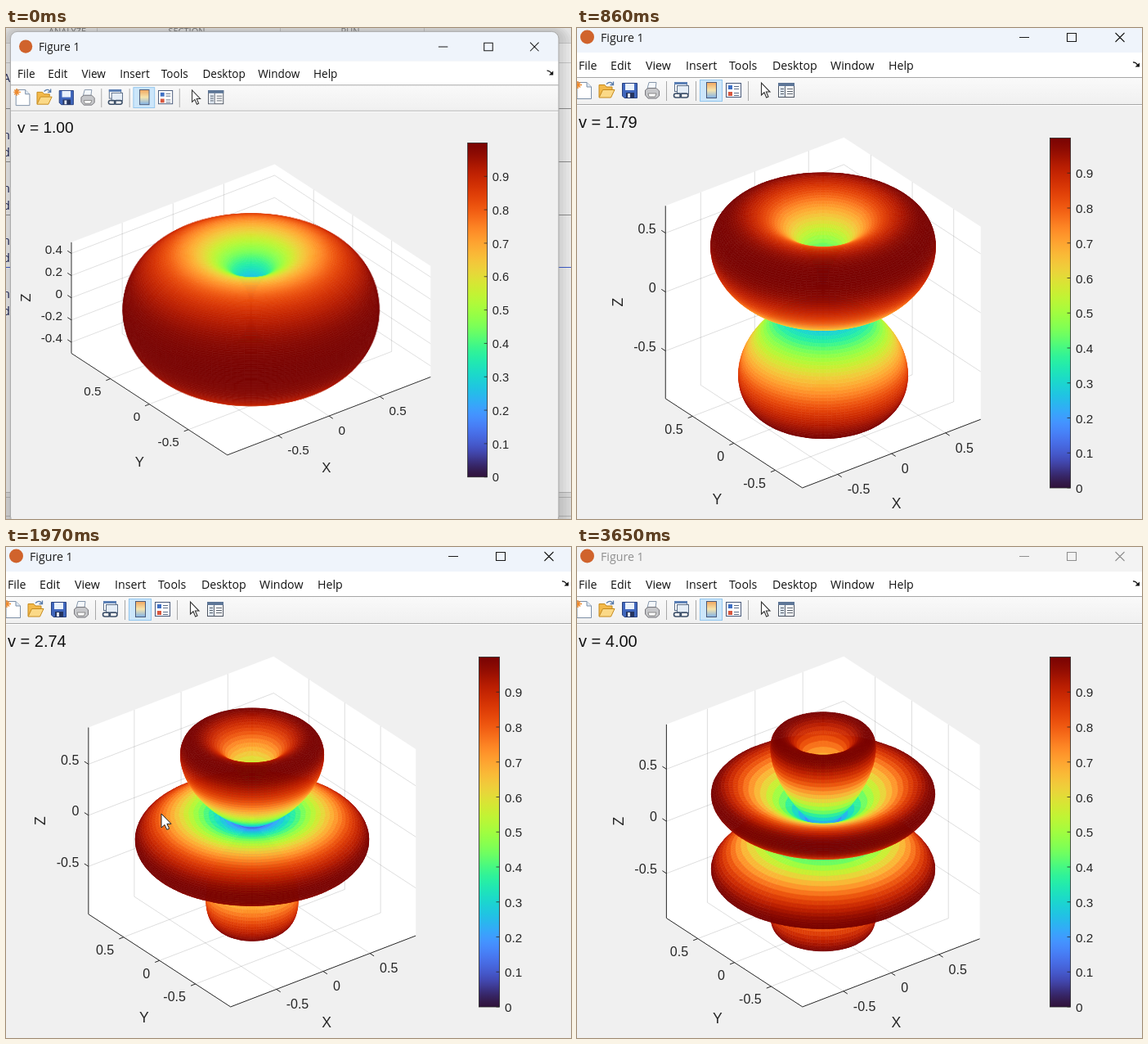
An HTML page with a canvas that plays this animation: 691x600 px, repeating every 3.77 s.

```html
<!DOCTYPE html>
<html lang="en">
<head>
<meta charset="utf-8">
<title>Figure 1</title>
<style>
html, body { margin: 0; width: 100%; height: 100%; overflow: hidden; background: #f0f0f0; }
#stage { position: relative; width: 691px; height: 600px; overflow: hidden; }
#stage svg, #stage canvas, #win { position: absolute; left: 0; top: 0; width: 691px; height: 600px; }
#stage svg { overflow: visible; }
#win { transform-origin: 271px 267px; }
.ui { font-family: "Open Sans", "Noto Sans", sans-serif; }
.plot { font-family: "Liberation Sans", Arial, sans-serif; }
</style>
</head>
<body>
<div id="stage">
  <svg id="desk"></svg>
  <div id="win">
    <svg><g id="chrome"></g><g id="axes"></g></svg>
    <canvas id="surface" width="691" height="600"></canvas>
  </div>
  <svg><path id="pointer" d="M190 326V343L194 339.4 196.8 345.4 199.6 344.1 196.9 338.3H202Z" fill="#fff" stroke="#222" stroke-width="1"/></svg>
</div>
<script>
const LOOP = 3770;
const STEPS = [0, 180, 310, 460, 630, 860, 990, 1160, 1390, 1540,
  1790, 1920, 2020, 2190, 2420, 2570, 2740, 2970, 3120, 3270];
const CENTER = { x: 301, y: 347.8 };
const FIT = { w: 460, h: 428.3 };
const AZ = -37.5 * Math.PI / 180, EL = Math.PI / 6;
const CA = Math.cos(AZ), SA = Math.sin(AZ), SE = Math.sin(EL), CE = Math.cos(EL);
const BAR = { x: 578.5, y: 134.5, w: 25, h: 427.5 };
const INK = "#262626";

const $ = id => document.getElementById(id);
const ctx = $("surface").getContext("2d");

const rect = (x, y, w, h, fill, more = "") =>
  `<rect x="${x}" y="${y}" width="${w}" height="${h}" fill="${fill}" ${more}/>`;
const path = (d, stroke, width = 1, fill = "none", more = "") =>
  `<path d="${d}" stroke="${stroke}" stroke-width="${width}" fill="${fill}" ${more}/>`;
const text = (x, y, str, size, kind = "plot", anchor = "start", fill = INK, more = "") =>
  `<text class="${kind}" x="${x}" y="${y + size * 0.36}" font-size="${size}" text-anchor="${anchor}" fill="${fill}" ${more}>${str}</text>`;

const STOPS = [0x30123b, 0x4454c4, 0x4490fe, 0x1fc8de, 0x29efa2, 0x7dff56,
  0xc1f334, 0xf1ca3a, 0xfe922a, 0xea4f0d, 0xbe2102, 0x7a0403];

// Smooth curve through the colour stops, x from 0 to 1.
function turbo(x) {
  const last = STOPS.length - 1, i = Math.min(last - 1, Math.floor(x * last)), f = x * last - i;
  const rgb = [16, 8, 0].map(bits => {
    const [a, b, c, d] = [-1, 0, 1, 2].map(k => STOPS[Math.min(last, Math.max(0, i + k))] >> bits & 255);
    const value = b + f / 2 * (c - a + f * (2 * a - 5 * b + 4 * c - d + f * (3 * (b - c) + d - a)));
    return Math.round(Math.min(255, Math.max(0, value)));
  });
  return `rgb(${rgb})`;
}

function drawDesk() {
  let s = rect(0, 0, 691, 600, "#f2f2f2") + rect(0, 0, 691, 18, "#e3e3e3") +
    path("M0 18.5H691M0 42.5H691", "#cbcbcb") +
    path("M0 98.5H691M0 163.5H691M0 228.5H691", "#8f8f8f") +
    path("M0 292.5H691", "#3f5fd0") +
    rect(0, 567, 691, 33, "#e0e0e0") + path("M0 567.5H691M0 573.5H691M0 596.5H691", "#b8b8b8") +
    path("M111.5 0V18M335.5 0V18M511.5 0V18", "#c4c4c4");
  [[75, "ANALYZE"], [221, "SECTION"], [421, "RUN"]].forEach(([x, t]) => {
    s += text(x, 4, t, 11, "ui", "middle", "#777");
  });
  s += text(5, 61, "A", 14, "ui", "end", "#222a5a");
  for (let i = 0; i < 4; i++) {
    s += text(5, 131 + i * 64.4, "n", 15, "ui", "end", "#222a5a") +
      text(5, 152 + i * 64.4, "d", 15, "ui", "end", "#222a5a");
  }
  $("desk").innerHTML = s;
}

function toolbar() {
  const page = "M0 66.5H12L17.5 72V86.5H0Z";
  let s = path(page, "#7c8fa6", 1, "#fff") + path("M12 66.5V72H17.5", "#7c8fa6", 1, "#dfe9f4") +
    path("M1 65V74M-3 69.5H6M-2 66.5L4 72.5M4 66.5L-2 72.5", "#ef8a2c", 1.5);
  s += path("M27 84.5V69.5H34L36 72H43V75", "#c58a1e", 1, "#f3b94a") +
    path("M27 85L31.5 75.5H46L41.5 85Z", "#c58a1e", 1, "#fbd987") +
    path("M36 68.5Q41 64 44 69M44.5 65.5V69.5H40.5", "#5579a8", 1.3);
  s += path("M55.5 67.5H73.5V85.5H58L55.5 83Z", "#27407f", 1, "#4067bd") +
    rect(59, 68, 11, 8, "#eaf2fc") + rect(60, 79, 10, 6.5, "#25345e") + rect(62, 80, 3, 5, "#dfe6f2");
  s += path("M86 74L88 66.5H97L96 74Z", "#8797aa", 1, "#f4f8fc") +
    path("M83.5 76L87 73.5H97L100.5 77V83L97 86H87L83.5 82Z", "#77777c", 1, "#c6c7ca") +
    path("M87 80H97L95.5 84H88Z", "#888", 1, "#fff");
  s += rect(119.5, 66.5, 15, 11, "#fff", 'stroke="#596c86"') + rect(119, 66, 16, 3, "#5a7fb5") +
    rect(122.5, 70.5, 14, 10, "#e5edf6", 'stroke="#596c86"') +
    rect(118.5, 80, 9, 5, "none", 'rx="2.5" stroke="#3c4f68" stroke-width="1.6"') +
    rect(126, 80, 10, 5, "none", 'rx="2.5" stroke="#3c4f68" stroke-width="1.6"');
  s += rect(150.5, 63.5, 27, 26, "#cce6fa", 'stroke="#92c6ee"') +
    rect(158.5, 66.5, 12, 19, "url(#mini)", 'stroke="#4d5a78"');
  s += rect(182.5, 67.5, 18, 17, "#fff", 'stroke="#48597a"') +
    rect(185, 70, 5, 5, "#3f70c4") + rect(185, 78, 5, 5, "#d8573f") +
    path("M192 71.5H198M192 74.5H198M192 79.5H198M192 82.5H198", "#5c6d88");
  s += path("M225.5 67V82L229 78.8 231.7 85 234 84 231.4 78H236Z", "#333", 1.1, "#fff");
  s += rect(246.5, 67.5, 19, 17, "#fff", 'stroke="#4b5361"') + rect(246, 67, 20, 4, "#5d7697") +
    rect(248, 72, 6, 12, "#dce5ef") +
    path("M254.5 71V84M249 74.5H253M249 77.5H253M249 80.5H253M257 74.5H264M257 77.5H264M257 80.5H264", "#59616d");
  return s + path("M109.5 65V89M145.5 65V89M209.5 65V89", "#a8a8a8");
}

function drawChrome() {
  const stops = Array.from({ length: 65 }, (_, i) =>
    `<stop offset="${i / 64}" stop-color="${turbo(i / 64)}"/>`).join("");
  let s = `<defs><linearGradient id="bar" x1="0" y1="1" x2="0" y2="0">${stops}</linearGradient>
    <linearGradient id="mini" x1="0" y1="0" x2="0" y2="1"><stop stop-color="#f0a65f"/>
    <stop offset=".5" stop-color="#f6e4ad"/><stop offset="1" stop-color="#7fb2e8"/></linearGradient>
    <linearGradient id="tools" x1="0" y1="0" x2="0" y2="1"><stop stop-color="#fafafa"/>
    <stop offset="1" stop-color="#f0f0f0"/></linearGradient>
    <clipPath id="frame"><rect x="-7" y="-8" width="702" height="629" rx="9"/></clipPath></defs>`;
  for (let d = 2; d <= 18; d += 4) {
    s += rect(-7 - d, -8 - d / 2, 702 + 2 * d, 640 + 2 * d, "#000", `opacity=".03" rx="${9 + d}"`);
  }
  s += `<g clip-path="url(#frame)">` + rect(-7, -8, 702, 629, "#f0f0f0") +
    rect(-7, -8, 702, 38, "#eff4fb", 'id="caption"') + rect(-7, 30, 702, 30, "#fff") +
    rect(-7, 60, 702, 33, "url(#tools)") + path("M-7 60.5H695M-7 93.5H695", "#a6a6a6") +
    path("M-7 94.5H695", "#fff") + "</g>";
  s += rect(-7, -8, 702, 629, "none", 'rx="9" stroke="#a9a9a9"');
  s += `<circle cx="12.5" cy="11" r="8.5" fill="#d0632c"/>`;
  s += `<g id="title">` + text(29, 11.5, "Figure 1", 14.2, "ui", "start", "currentColor") +
    path("M541 11.5H553M599.5 6.5H610.5V16.5H599.5ZM658.5 6L669.5 17M669.5 6L658.5 17", "currentColor", 1.1) + "</g>";
  [["File", 2], ["Edit", 41], ["View", 84], ["Insert", 133], ["Tools", 186],
    ["Desktop", 239], ["Window", 310], ["Help", 381]].forEach(([t, x]) => {
    s += text(x, 45.8, t, 14.2, "ui", "start", "#111");
  });
  s += path("M680 42Q683 41.5 686 45.5", "#111", 1.3) + path("M688 42.5V47.5H682.5Z", "none", 0, "#111") + toolbar();
  s += rect(BAR.x, BAR.y, BAR.w, BAR.h, "url(#bar)", `stroke="${INK}" stroke-width=".8"`);
  for (let i = 0; i < 10; i++) {
    const y = BAR.y + BAR.h * (1 - i / 10);
    s += path(`M${BAR.x + BAR.w} ${y}h-4`, INK, 0.8) +
      text(610, y + 0.5, i ? "0." + i : "0", 15.3);
  }
  $("chrome").innerHTML = s;
}

// Extent of r = |sin(v * theta)| and the scale that fits its tight box.
function measure(v) {
  let R = 0, lo = 0, hi = 0;
  for (let i = 0; i <= 720; i++) {
    const a = i * Math.PI / 720, r = Math.abs(Math.sin(v * a));
    R = Math.max(R, r * Math.sin(a));
    lo = Math.min(lo, r * Math.cos(a));
    hi = Math.max(hi, r * Math.cos(a));
  }
  const w = 2 * R * (CA - SA), h = w * SE + (hi - lo) * CE;
  return { R, lo, hi, mid: (lo + hi) / 2, s: Math.min(FIT.w / w, FIT.h / h) };
}

function drawAxes(v, m) {
  const { R, lo, hi, s } = m;
  const at = (x, y, z) => [
    CENTER.x + s * (x * CA + y * SA),
    CENTER.y - s * ((CA * y - SA * x) * SE + (z - m.mid) * CE)
  ];
  const line = (...pts) => "M" + pts.map(p => p.map(n => n.toFixed(2)).join(" ")).join("L");
  const zStep = hi - lo < 1.2 ? 0.2 : 0.5;
  const zTicks = [-2, -1, 0, 1, 2].map(k => k * zStep).filter(z => z > lo && z < hi);
  const label = n => String(+n.toFixed(1));
  let grid = "", ticks = "", words = "";
  for (const k of [-0.5, 0, 0.5]) {
    grid += line(at(k, -R, lo), at(k, R, lo), at(k, R, hi)) +
      line(at(-R, k, lo), at(R, k, lo), at(R, k, hi));
    const [xx, xy] = at(k, -R, lo), [yx, yy] = at(-R, k, lo);
    ticks += line([xx, xy], [xx + 5, xy + 3.3]) + line([yx, yy], [yx - 5.6, yy + 2.2]);
    words += text(xx + 12, xy + 18, label(k), 16) +
      text(yx - 11.7, yy + 15.8, label(k), 16, "plot", "end");
  }
  for (const z of zTicks) {
    const [x, y] = at(-R, R, z);
    grid += line([x, y], at(R, R, z), at(R, -R, z));
    ticks += line([x, y], [x - 5, y - 3.3]);
    words += text(x - 11.5, y - 5.5, label(z), 16, "plot", "end");
  }
  const left = at(-R, R, lo), front = at(-R, -R, lo), right = at(R, -R, lo);
  const hull = line(left, front, right, at(R, -R, hi), at(R, R, hi), at(-R, R, hi)) + "Z";
  const wide = R * s - 144;
  const [zx, zy] = at(-R, R, m.mid), [nx, ny] = at(0, -R, lo), [wx, wy] = at(-R, 0, lo);
  words += text(nx + 3.7 - wide * 0.35, ny + 62 + wide * 0.17, "X", 17.6, "plot", "middle") +
    text(wx - 18.5 + wide * 0.3, wy + 69.5 + wide * 0.2, "Y", 17.6, "plot", "middle") +
    text(0, 0, "Z", 17.6, "plot", "middle", INK, `transform="translate(${zx - 58.8} ${zy}) rotate(-90)"`) +
    text(2, 114.5, "v = " + v.toFixed(2), 20, "plot", "start", "#111");
  $("axes").innerHTML = path(hull, "none", 0, "#fff") + path(grid, INK, 1, "none", 'opacity=".15"') +
    path(line(at(-R, R, hi), left, front, right) + ticks, INK, 1) + words;
}

function drawSurface(v, m) {
  const NT = 180, NP = 120, rows = [], quads = [];
  for (let i = 0; i <= NT; i++) {
    const a = i * Math.PI / NT, r = Math.abs(Math.sin(v * a));
    const ring = r * Math.sin(a), z = r * Math.cos(a), row = [];
    for (let j = 0; j <= NP; j++) {
      const p = j * 2 * Math.PI / NP, back = ring * Math.sin(p);
      row.push([
        CENTER.x + m.s * ring * Math.cos(p),
        CENTER.y - m.s * (back * SE + (z - m.mid) * CE),
        z * SE - back * CE
      ]);
    }
    rows.push(row);
  }
  for (let i = 0; i < NT; i++) {
    const color = turbo(Math.abs(Math.sin(v * (i + 0.5) * Math.PI / NT)));
    for (let j = 0; j < NP; j++) {
      const a = rows[i][j], b = rows[i + 1][j], c = rows[i + 1][j + 1], d = rows[i][j + 1];
      const facing = (c[0] - a[0]) * (d[1] - b[1]) - (c[1] - a[1]) * (d[0] - b[0]);
      if (facing < 0) quads.push({ pts: [a, b, c, d], depth: a[2] + b[2] + c[2] + d[2], color });
    }
  }
  quads.sort((p, q) => p.depth - q.depth);
  ctx.clearRect(0, 0, 691, 600);
  ctx.lineWidth = 0.6;
  ctx.lineJoin = "round";
  for (const { pts, color } of quads) {
    ctx.fillStyle = ctx.strokeStyle = color;
    ctx.beginPath();
    pts.forEach(p => ctx.lineTo(p[0], p[1]));
    ctx.closePath();
    ctx.fill();
    ctx.stroke();
  }
}

let shown = -1;
function render(t) {
  const step = STEPS.findLastIndex(start => t >= start);
  if (step !== shown) {
    shown = step;
    const v = 1 + 3 * step / (STEPS.length - 1), m = measure(v);
    drawAxes(v, m);
    drawSurface(v, m);
  }
  const zoom = t < 80 ? 0.955 : t < 130 ? 0.985 : 1;
  $("win").style.transform = zoom < 1 ? `scale(${zoom})` : "none";
  const active = t < 3650;
  $("caption").setAttribute("fill", active ? "#eff4fb" : "#f3f3f3");
  $("title").style.color = active ? "#1a1a1a" : "#8f8f8f";
  $("pointer").style.display = t >= 1970 && t < 2020 ? "" : "none";
}

drawDesk();
drawChrome();
const begin = performance.now();
function tick() {
  render((performance.now() - begin) % LOOP);
  requestAnimationFrame(tick);
}
tick();
</script>
</body>
</html>
```
